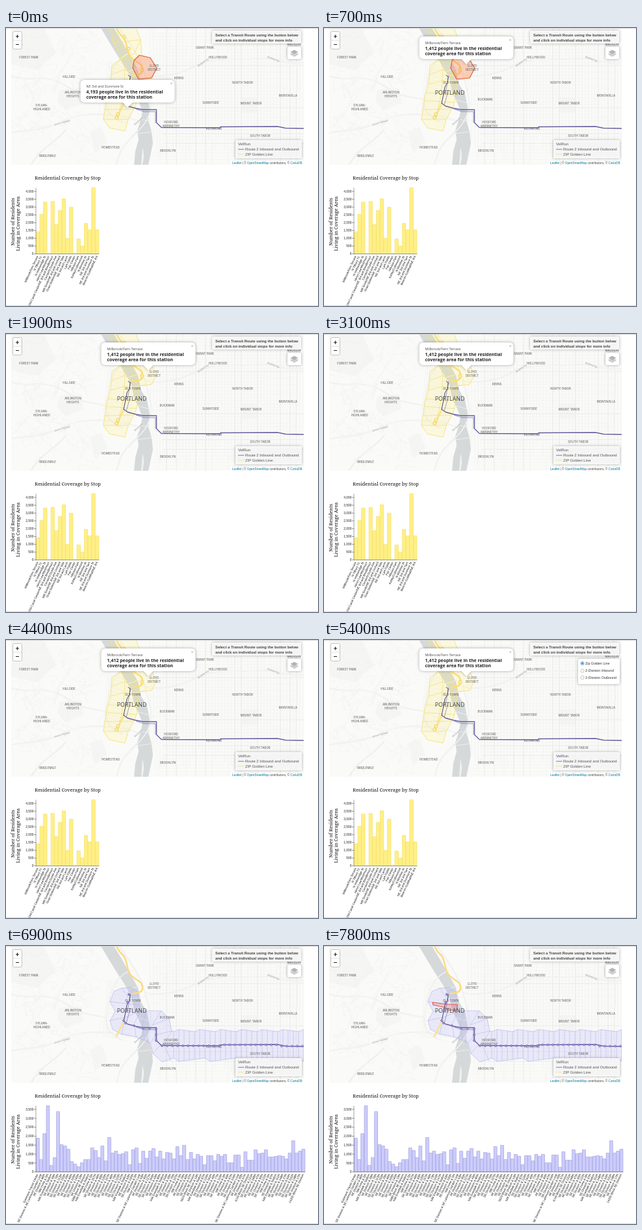
Recreate the animation shown at these times as an HTML page. Size 480 px wide and 429 px high, loop 7.9 s.

```html
<!DOCTYPE html>
<html lang="en">
<head>
<meta charset="utf-8">
<title>Transit coverage map</title>
<style>
html, body { margin: 0; width: 100%; height: 100%; overflow: hidden; background: #fff; }
svg { display: block; width: 100%; height: 100%; font-family: "Liberation Sans", sans-serif; }
.place { font: 500 4.4px Inter, sans-serif; fill: #6c6c6c; text-anchor: middle; }
.road { font: italic 3.6px "Open Sans", sans-serif; fill: #909090; text-anchor: middle; }
.city { font: 8.8px "Open Sans", sans-serif; fill: #444; text-anchor: middle; }
.serif { font: 7.4px "Noto Serif", serif; fill: #111; text-anchor: middle; }
.tick { font-size: 4.9px; fill: #222; text-anchor: end; }
.stop { font-size: 4.5px; fill: #111; text-anchor: end; }
.name { font: 5.2px "Open Sans", sans-serif; fill: #444; }
.people { font: bold 6.95px "Open Sans", sans-serif; fill: #222; }
.hot { fill: #f03b3b; fill-opacity: .22; stroke: #e0604c; stroke-width: 1.2; stroke-linejoin: round; }
.panel { fill: #fff; filter: drop-shadow(0 0 2px #0005); }
.line { fill: none; stroke-linejoin: round; stroke-linecap: round; }
</style>
</head>
<body>
<svg id="stage" viewBox="0 0 480 429"></svg>
<script>
const LOOP = 7900;
const stage = document.getElementById('stage');

let seed = 11;
const random = () => (seed = (seed * 16807) % 2147483647) / 2147483647;
const range = (n, fn) => Array.from({ length: n }, (_, i) => fn(i)).join('');
const text = (x, y, s, attrs = '') => `<text x="${x}" y="${y}" ${attrs}>${s}</text>`;
const path = (d, attrs = '') => `<path d="${d}" ${attrs}/>`;
const rect = (x, y, w, h, attrs = '') => `<rect x="${x}" y="${y}" width="${w}" height="${h}" ${attrs}/>`;
const dot = (x, y, r, attrs = '') => `<circle cx="${x}" cy="${y}" r="${r}" ${attrs}/>`;
const group = (id, body, attrs = '') => `<g id="${id}" ${attrs}>${body}</g>`;
const stroke = (color, width) => `class="line" stroke="${color}" stroke-width="${width}"`;

// ---- Base map
function streets() {
  let minor = '', major = '';
  for (let x = 222; x < 460; x += 5) {
    const top = random() * 50, end = 211 - random() * 45;
    minor += `M${x} ${top}V${end}`;
    if (random() < .22) major += `M${x} 0V211`;
  }
  for (let y = 3; y < 211; y += 5) {
    const left = 220 + random() * 30;
    minor += `M${left} ${y}H${458 - random() * 60}`;
    if (random() < .2) major += `M${left} ${y}H458`;
  }
  // Downtown blocks follow the river at a slight tilt.
  for (let i = 0; i < 15; i++) {
    minor += `M${157 + i * 3} 52l-8 90M${160 - i * .4} ${54 + i * 6}l34 9`;
  }
  // Winding roads over the western hills.
  for (let i = 0; i < 95; i++) {
    const x = 10 + random() * 138, y = 3 + random() * 205;
    const bend = () => (random() * 34 - 17).toFixed(1);
    minor += `M${x} ${y}q${bend()} ${bend()} ${bend()} ${bend()}t${bend()} ${bend()}`;
  }
  return path(minor, stroke('#f0f0ef', .6)) + path(major, stroke('#e8e8e7', .8));
}

const highways = [
  'M8 162C35 156 55 160 82 146S130 132 160 134S187 139 203 143',
  'M214 72C235 78 270 71 292 58S350 50 385 47S430 58 458 54',
  'M174 0C191 24 209 50 214 72S228 114 221 132S207 155 191 171S174 196 170 211',
  'M192 38C166 47 159 75 155 102S158 133 178 145',
  'M446 0C442 30 452 65 447 98S451 160 446 211',
  'M8 74C34 84 60 68 92 89S128 104 155 111',
  'M38 211C58 180 76 178 91 158'
].map(d => path(d, stroke('#e2e2e2', 1.7)) + path(d, stroke('#fff', .9))).join('');

const placeNames = [
  [35, 47, 'FOREST PARK'], [97, 77, 'HILLSIDE'], [103, 101, 'ARLINGTON'], [103, 107, 'HEIGHTS'],
  [55, 121, 'SYLVAN-'], [55, 127, 'HIGHLANDS'], [161, 186, 'HOMESTEAD'], [64, 199, 'BRIDLEMILE'],
  [228, 60, 'LLOYD'], [228, 66, 'DISTRICT'], [195, 86, 'OLD TOWN'], [266, 79, 'KERNS'],
  [248, 112, 'BUCKMAN'], [254, 147, 'HOSFORD'], [254, 152.5, 'ABERNETHY'], [320, 157, 'RICHMOND'],
  [249, 191, 'BROOKLYN'], [315, 117, 'SUNNYSIDE'], [377, 118, 'MOUNT TABOR'], [364, 86, 'NORTH TABOR'],
  [434, 106, 'MONTAVILLA'], [391, 168, 'SOUTH TABOR'], [326, 47, 'HOLLYWOOD'], [306, 32, 'GRANT PARK'],
  [443, 27, 'MADISON']
].map(p => text(...p, 'class="place"')).join('');

const roadNames = [[87, 147, -17, 'Sunset Highway'], [304, 54, -35, 'Banfield Fwy'], [411, 49, 22, 'Banfield Fwy'], [204, 145, -42, 'Marquam']]
  .map(([x, y, a, s]) => text(x, y, s, `class="road" transform="rotate(${a} ${x} ${y})"`)).join('');
const labels = placeNames + roadNames + text(193.5, 103, 'PORTLAND', 'class="city"');

const river = 'M146 0H166L178 20L191 43L203 64L208 87L217 102L221 123L219 143L224 160L226 178L219 211H197L199 190L204 172L202 158L207 143L210 128L204 113L197 99L193 78L183 60L170 40L159 22Z';
const baseMap = rect(8, 1, 450, 210, 'fill="#fafaf8"') +
  path('M8 1H58L77 38L48 65L8 56ZM82 95L116 93L119 116L91 127L79 113ZM363 107h25v24h-25ZM129 160l18-8l9 24l-19 17Z', 'fill="#f5f6f3"') +
  streets() + path(river, 'fill="#d5d9da"') +
  path('M210 184q4 12 0 27h-2Z', 'fill="#f2f2f0"') +
  path('M188 67l17-5M194 82l20-4M198 99l18-2M204 111l17 5M205 140l16 4M202 163l23-3', stroke('#f0f0ee', 1)) +
  highways;

// ---- Routes and coverage areas
const yellowLine = path('M170 0Q174 9 179 13T187 34Q190 45 197 49L208 57Q213 68 206 71L193 74', stroke('#fbdb82', 2.6)) +
  path('M181 117L170 139', stroke('#f8e3a0', 3));
const eastbound = 'M181 116L187 120.5L200 124L211 126H231.5V146L239 153.5L330 154V152.5L418 152L430 154.5L458 155';
const blueRoute = path('M188 73L191 75L190 84L186 91L184 102L181 116', stroke('#45416a', 1)) +
  path('M192 74L187 99L190 101L185 119', stroke('#6a669a', .6)) +
  path('M200 125L212 129H230V146', stroke('#7773b0', .8)) +
  path(eastbound, stroke('#67619f', 1.3));

const yellowArea = path(
  'M160 0H200L207 18L209 42L222 46L232 62L224 78L205 80L204 100L199 121L188 141L183 159L159 154L150 141L155 106L161 86L163 58L178 47L165 23Z',
  'fill="#ffeb52" fill-opacity=".16" stroke="#f7e27c" stroke-width=".9"') +
  path('M162 72L183 64L205 79M183 64L178 47L197 50L209 42M197 50L195 62L205 79M160 87L182 81L205 86M182 81L183 64M157 100L203 103M180 101L182 81M155 112L201 115M178 114L180 101M152 126L196 125M175 125L178 114M150 141L188 141M173 140L175 125M165 23L207 18M178 47L197 40L207 18',
    stroke('#f7e27c', .8)) +
  [[209, 65], [189, 32], [182, 14], [172, 133], [170, 138]]
    .map(([x, y]) => dot(x, y, 2.4, 'fill="#fff2ad" stroke="#ecc94f" stroke-width=".8"')).join('');

// The eastern strip has one cell per stop, with slightly uneven ends.
const cellTop = i => 132 - (i * 7) % 4;
const cellEnd = i => 173 + (i * 5) % 6;
const cellX = i => 258 + i * 8;
const purpleArea = path(
  'M166 70L178 65L192 64L202 70L207 100H239L251 112L255 131' +
  range(26, i => `L${cellX(i)} ${cellTop(i)}`) + range(26, i => `L${cellX(25 - i)} ${cellEnd(25 - i)}`) +
  'L240 179L226 166L222 150L200 140L178 136L164 129L160 115L168 101L160 86Z',
  'fill="#a0a0ff" fill-opacity=".18" stroke="#b9b9ee" stroke-width=".7"') +
  path('M160 86L204 91M168 101L206 98M160 115L184 110L207 100M184 110L178 136M190 82L178 65M190 82L202 70M197 120L200 140M197 120L207 100M210 122L216 100M210 122L213 145M225 122L239 100M225 122L251 112M231 137L255 131M231 137L222 150M238 152L226 166M243 152L254 177M243 152L255 131' +
    range(26, i => `M${cellX(i)} ${cellTop(i)}V${cellEnd(i)}`), stroke('#b9b9ec', .6));

const purpleStops = [[189, 75], [187, 87], [185, 100], [181, 115], [184, 119], [197, 123], [211, 127], [221, 127], [231, 128], [231, 137], [231, 146]]
  .concat(Array.from({ length: 28 }, (_, i) => [240 + i * 8, i < 12 ? 154 : i < 23 ? 152.5 : 154.5]))
  .map(([x, y]) => dot(x, y, 1.4, 'fill="#b9b7ee" stroke="#5f59a8" stroke-width=".8"')).join('');

// ---- Charts
const BASE = 348.7;
function chart(heights, stops, { pitch, unit, ticks, fill, edge }) {
  const bars = heights.map((h, i) => rect(46.3 + i * pitch, BASE - h, pitch - .3, h, `fill="${fill}" stroke="${edge}" stroke-width=".6"`)).join('');
  const axis = range(ticks, i => {
    const y = BASE - i * unit;
    return path(`M43.5 ${y}H46`, stroke('#333', .5)) + text(42.5, y + 1.7, (i * 500).toLocaleString('en-US'), 'class="tick"');
  });
  const names = stops.map((s, i) => {
    const x = 46 + (i + .5) * pitch + 1;
    return text(x, 352.5, s, `class="stop" transform="rotate(-65 ${x} 352.5)"`);
  }).join('');
  return bars + axis + path(`M46 247V${BASE}H${46 + heights.length * pitch}`, stroke('#444', .5)) + names;
}

const yellowHeights = [34, 61, 80, .6, 81, 45, 67, 85, 24, 72, .6, 23, 12, 47, 37, 102, 37];
const yellowNames = ['Millbrook/Fern Terrace', 'N Tilbury TC', 'N Hollowridge St', 'Heron Lea/Westmoor',
  'Old Canal Center/NE 3rd and Brindlemoor', 'Corran/N Dunlin Ave', 'Mill South/NE 3rd and Orchard',
  'Grain Station/NE 3rd and Vale', 'NE 3rd and Larch', 'Lark Fields', 'Fair Center', 'Hillview Park',
  'Ashby/Cottonwood', 'N Winslow St', 'NE 3rd and Tarn', 'NE 3rd and Dunmore St', 'Beacon Guildhall/NE 3rd'];
const purpleHeights = [52, 19, 59, 102, 10, 22, 93, 42, 40, 35, 16, 12, 8, 14, 19, 19, 37, 33, 22, 40,
  17, 53, 29, 32, 27, 28, 31, 11, 34, 37, 13, 32, 21, 32, 36, 23, 32, 20, 30, 29,
  20, 39, 25, 41, 19, 30, 20, 27, 24, 11, 25, 25, 17, 27, 24, 27, 14, 14, 26, 26,
  7, 31, 18, 18, 34, 28, 29, 34, 23, 23, 24, 25, 24, 20, 29, 48, 29, 32, 35];
const purpleNames = purpleHeights.map((_, i) =>
  i === 0 ? 'Eastmere Transit Center' :
  i === 78 ? '14200 Block SE Division' :
  i % 29 === 1 ? 'SE Division &amp; SE Larkmoor Garden Loop' :
  i % 13 === 3 ? 'NW Irvine &amp; 5th' :
  i % 11 === 4 ? 'NW Everdale &amp; Station' :
  i % 16 === 14 ? `${2400 + i * 70} Block SE Division` :
  `SE Division &amp; ${12 + (i * 37) % 158}th`);

const yellowChart = chart(yellowHeights, yellowNames, { pitch: 5.7, unit: 12.06, ticks: 9, fill: '#ffef86', edge: '#f2dd64' });
const purpleChart = chart(purpleHeights, purpleNames, { pitch: 5.24, unit: 13.8, ticks: 8, fill: '#ccccff', edge: '#9c9cd2' });
const chartTitles = text(95, 234, 'Residential Coverage by Stop', 'class="serif"') +
  text(0, 0, 'Number of Residents', 'class="serif" transform="translate(12.5 299) rotate(-90)"') +
  text(0, 0, 'Living in Coverage Area', 'class="serif" transform="translate(21 302) rotate(-90)"');

// ---- Controls and popups
const popup = (id, x, y, name, count) => group(id,
  path(`M${x + 7} ${y}h131q7 0 7 7v21q0 7-7 7H${x + 80}l-7.5 8l-7.5-8H${x + 7}q-7 0-7-7V${y + 7}q0-7 7-7Z`, 'class="panel"') +
  text(x + 9, y + 12, name, 'class="name"') +
  text(x + 9, y + 20.5, `${count} people live in the residential`, 'class="people"') +
  text(x + 9, y + 28.5, 'coverage area for this station', 'class="people"') +
  text(x + 138, y + 8, '×', 'font-size="7" fill="#aaa"'));

const zoom = rect(10.5, 5.5, 14, 27, 'rx="2" fill="#fff" stroke="#c4c4c4" stroke-width="1"') + path('M11 19H24', stroke('#ccc', .6)) +
  path('M15 13H20M17.5 10.5V15.5M15 25.5H20', 'fill="none" stroke="#222" stroke-width="1.2"');
const info = rect(317, 4, 137, 20, 'rx="2" class="panel" fill-opacity=".85"') +
  `<g font-weight="bold" font-size="5.9" fill="#444">${text(322, 13.3, 'Select a Transit Route using the button below')}${text(322, 20.7, 'and click on individual stops for more info')}</g>`;
const legend = rect(353, 173, 102, 28, 'rx="2" class="panel" fill-opacity=".85"') +
  path('M357.5 187.2H366', stroke('#7d79b0', 1)) + path('M357.5 194.7H366', stroke('#f6e39a', 1)) +
  `<g font-size="5.9" fill="#555">${text(357, 181, 'VelRun')}${text(368, 189.2, 'Route 2 Inbound and Outbound')}${text(368, 196.7, 'ZIP Golden Line')}</g>`;
const credit = rect(346, 205, 112, 6, 'fill="#fff" fill-opacity=".75"') +
  text(348, 210, '<tspan fill="#0078a8">Leaflet</tspan> | © <tspan fill="#0078a8">OpenStreetMap</tspan> contributors, © <tspan fill="#0078a8">CartoDB</tspan>', 'font-size="4.74" fill="#444"');
const layerButton = rect(433, 29, 21, 19, 'rx="2.5" class="panel"') +
  path('M437.5 41l6 3.5l6-3.5v-2h-12Z', 'fill="#cfcfcf"') + path('M437.5 37l6-3.2l6 3.2l-6 3.2Z', 'fill="#b4b4b4"');
const radios = [[36, 'Zip Golden Line'], [47.5, '2-Division Inbound'], [58, '2-Division Outbound']].map(([y, s], i) =>
  dot(397.5, y, 2.6, `id="radio${i}" fill="#fff" stroke="#aaa" stroke-width=".7"`) + text(402, y + 1.9, s, 'font-size="5.3" fill="#333"')).join('');
const menu = rect(391, 29, 64, 39, 'rx="2.5" class="panel"') + radios + dot(397.5, 36, 1.5, 'fill="#2f82d8"');

stage.innerHTML = `<clipPath id="frame">${rect(8, 1, 450, 210)}</clipPath>` +
  rect(0, 0, 480, 429, 'fill="#fff"') + rect(0, 0, 480, .8, 'fill="#ccc"') + rect(0, 428.2, 480, .8, 'fill="#ccc"') +
  group('map', baseMap + group('purpleArea', purpleArea) + yellowLine + group('yellowArea', yellowArea) +
    path('M205 42L222 46L232 62L224 77L204 79L195 62L197 50Z', 'id="eastHover" class="hot"') +
    path('M167 87L190 90L205 90.5L204.5 99L190 99L187 95L168 91Z', 'id="townHover" class="hot"') +
    labels + blueRoute + group('purpleStops', purpleStops) +
    zoom + info + legend + credit + group('layerButton', layerButton) + group('menu', menu) +
    popup('townPopup', 114.5, 80, 'NE 3rd and Dunmore St', '4,193') +
    popup('eastPopup', 146.5, 13, 'Millbrook/Fern Terrace', '1,412'), 'clip-path="url(#frame)"') +
  chartTitles + group('yellowChart', yellowChart) + group('purpleChart', purpleChart);

// ---- Timeline
const SWITCH = 6600;
const ramp = (t, from, length) => Math.min(1, Math.max(0, (t - from) / length));
const show = (id, amount) => { document.getElementById(id).style.opacity = Number(amount); };
const within = (t, from, to) => t >= from && t < to;

function render(t) {
  const yellow = t < SWITCH;
  const open = within(t, 5200, 6800);
  ['yellowArea', 'yellowChart'].forEach(id => show(id, yellow));
  ['purpleArea', 'purpleStops', 'purpleChart'].forEach(id => show(id, !yellow));
  show('townPopup', 1 - ramp(t, 200, 200));
  show('eastPopup', yellow ? ramp(t, 200, 200) : 0);
  show('eastHover', t < 900);
  show('townHover', t >= 7700);
  show('menu', open);
  show('layerButton', !open);
  const hovered = t < 5600 ? 0 : t < 5900 ? 1 : 2;
  for (let i = 0; i < 3; i++) {
    document.getElementById('radio' + i).style.stroke = i === 0 ? '#2f82d8' : i === hovered ? '#444' : '#aaa';
  }
}

const start = performance.now();
function tick() {
  render((performance.now() - start) % LOOP);
  requestAnimationFrame(tick);
}
tick();
</script>
</body>
</html>
```
